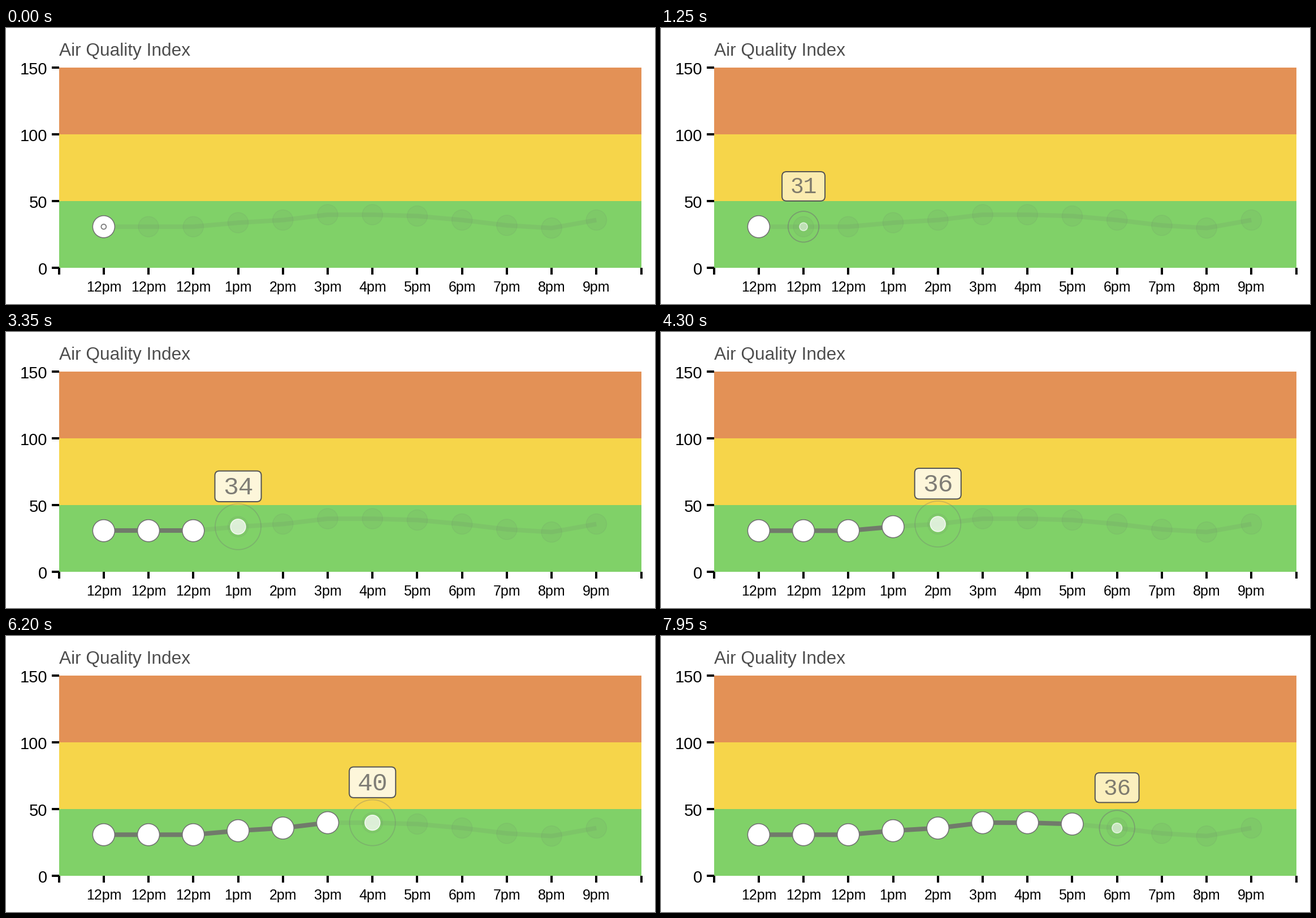
A matplotlib script that plays this animation: 1148 px wide and 488 px high, repeating every 8 s.

```python
import math

import matplotlib.pyplot as plt
from matplotlib.animation import FuncAnimation
from matplotlib.patches import Circle, FancyBboxPatch, Rectangle

W, H, DPI = 1148, 488, 100
FRAMES, STEP = 160, 50
PERIOD = 19          # frames spent on each reading

LEFT, RIGHT, BASE, UNIT = 93.6, 1123.6, 424, 2.36
VALUES = [31, 31, 31, 34, 36, 40, 40, 39, 36, 32, 30, 36]
HOURS = ["12pm"] * 3 + [f"{h}pm" for h in range(1, 10)]
GAP = (RIGHT - LEFT) / (len(VALUES) + 1)
XS = [LEFT + GAP * (i + 1) for i in range(len(VALUES))]
YS = [BASE + 0.5 - UNIT * v for v in VALUES]
GREY = "#6e756c"


def pt(px):
    return px * 72 / DPI


fig = plt.figure(figsize=(W / DPI, H / DPI), dpi=DPI, facecolor="white")
ax = fig.add_axes([0, 0, 1, 1])
ax.set_xlim(0, W)
ax.set_ylim(H, 0)
ax.axis("off")


def line(xs, ys, width, color, **kw):
    return ax.plot(xs, ys, color=color, lw=pt(width),
                   solid_capstyle="butt", **kw)[0]


def text(x, y, s, size, color="black", ha="center", font="Liberation Sans", **kw):
    return ax.text(x, y, s, fontsize=pt(size), color=color, ha=ha,
                   va="baseline", family=font, **kw)


def circle(x, y, r, **kw):
    return ax.add_patch(Circle((x, y), r, **kw))


# Bands, axes and labels
for low, color in ((0, "#80d168"), (50, "#f6d54a"), (100, "#e39156")):
    ax.add_patch(Rectangle((LEFT, BASE - UNIT * (low + 50)), RIGHT - LEFT,
                           UNIT * 50, fc=color, lw=0, zorder=0))
for v in (0, 50, 100, 150):
    y = BASE - UNIT * v
    line([81, LEFT], [y, y], 4, "black")
    text(73, y + 11.5, str(v), 29.17, ha="right")
for i in range(len(VALUES) + 2):
    x = LEFT + GAP * i
    line([x, x], [BASE, BASE + 12], 4, "black")
for x, hour in zip(XS, HOURS):
    text(x, 466, hour, 25)
text(94, 49, "Air Quality Index", 31.6, "#4d4d4d", "left")

# Faint preview of the whole series
line(XS, YS, 8, GREY, alpha=0.12, zorder=2)
for x, y in zip(XS, YS):
    circle(x, y, 18, fc=(0.43, 0.46, 0.42, 0.08),
           ec=(0.43, 0.46, 0.42, 0.1), lw=pt(1.5), zorder=2.1)

# Revealed part
trail = line([], [], 8, "#717a6b", zorder=3)
dots = [circle(x, y, 19.5, fc="white", ec="#737373", lw=pt(1.6), zorder=4)
        for x, y in zip(XS, YS)]

# Marker, ring and value label of the current reading
core = circle(0, 0, 1, lw=pt(1.5), zorder=5)
ring = circle(0, 0, 1, fc="none", lw=pt(1.8), zorder=6)
box = ax.add_patch(FancyBboxPatch((0, 0), 1, 1, lw=pt(2), zorder=7,
                                  boxstyle="round,pad=0,rounding_size=8"))
value = text(0, 0, "", 40, "#555555", font="Liberation Mono", zorder=8)


def update(n):
    k, j = divmod(n + 1, PERIOD)
    u = min(1, (j + 2) / 16)
    p = (1 - math.cos(math.pi * u)) / 2
    x, y = XS[k], YS[k]

    trail.set_data(XS[:k], YS[:k])
    for i, dot in enumerate(dots):
        dot.set_visible(i < max(k, 1))

    core.center = ring.center = (x, y)
    core.set_radius(15.3 * p ** 1.5)
    core.set_facecolor((1, 1, 1, 0.1 + 0.7 * p))
    core.set_edgecolor((1, 1, 1, 0.3 + 0.6 * p))
    ring.set_radius(44 * p ** 0.93)
    ring.set_edgecolor((0.45, 0.45, 0.45, 1 - 0.75 * p))

    em = 30 + 16 * p
    w, h = 1.2 * em + 28.5, 0.5 * em + 32
    cy = y - 71.4
    shown = min(1, max(0, (j - 1) / 4))
    box.set_bounds(x - w / 2, cy - h / 2, w, h)
    box.set_facecolor((1, 1, 1, (0.14 + 0.72 * p) * shown))
    box.set_edgecolor((0.33, 0.33, 0.33, shown))
    value.set_text(str(VALUES[k]))
    value.set_position((x, cy + 0.315 * em))
    value.set_fontsize(pt(em))
    value.set_alpha(0.75 * shown)
    return [trail, *dots, core, ring, box, value]


anim = FuncAnimation(fig, update, frames=FRAMES, interval=STEP,
                     repeat=True, repeat_delay=0, blit=False)
plt.show()
```
